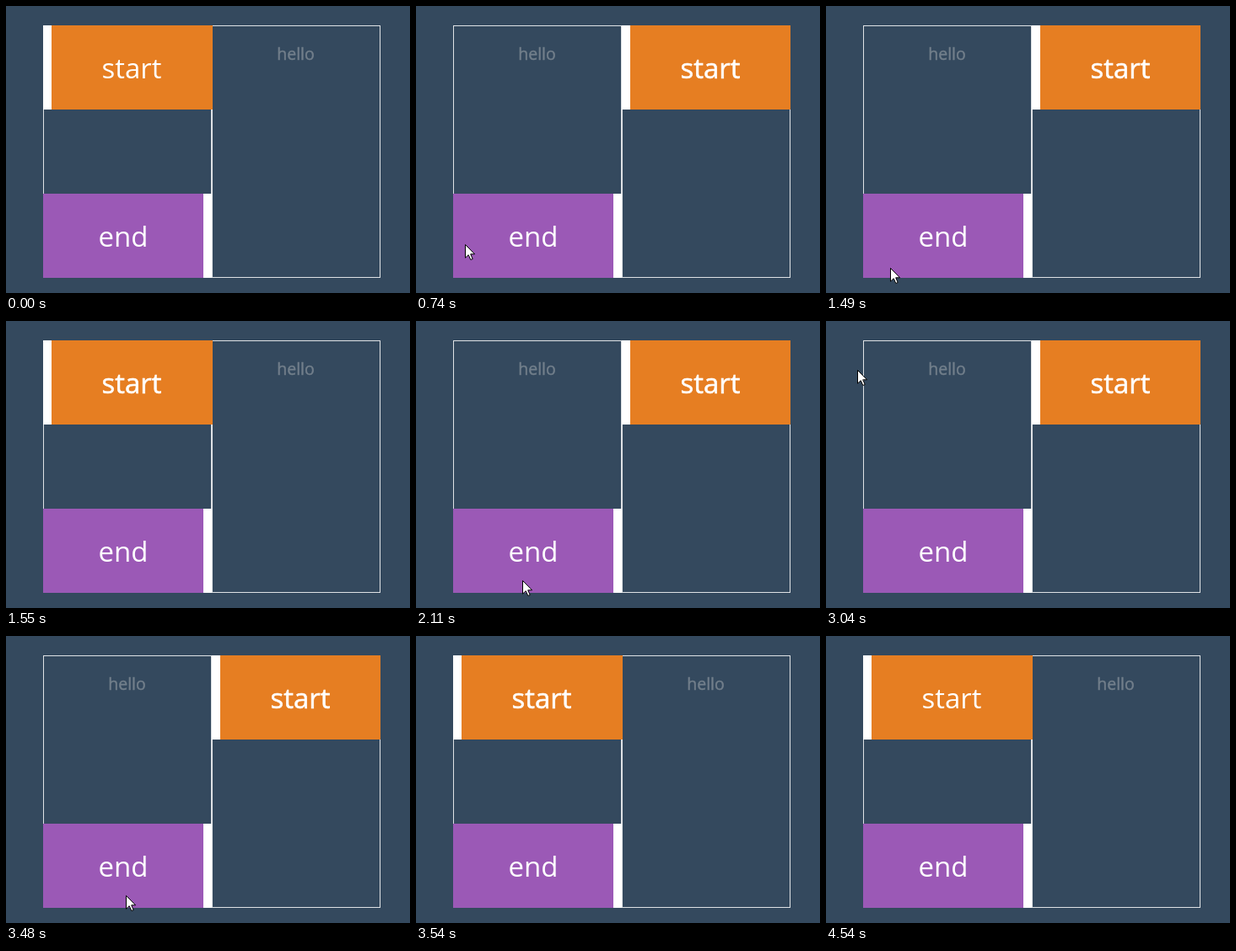
Animation, 479 px wide and 341 px high, one loop 4760 ms. Source, as an HTML page:

```html
<!DOCTYPE html>
<html lang="en">
<head>
<meta charset="utf-8">
<title>Start and end boxes swapping on hover</title>
<style>
  html, body { margin: 0; width: 100%; height: 100%; overflow: hidden; background: #34495e; }
  svg { display: block; }
  text { font: 33px "Open Sans", "Noto Sans", sans-serif; fill: #fff; text-anchor: middle; }
  #hello { font-size: 19.5px; fill: #727f8b; stroke: #727f8b; stroke-width: .4; }
  #label { stroke: #fff; }
</style>
</head>
<body>
<svg width="479" height="341" viewBox="0 0 479 341">
  <g fill="none" stroke="#dfe2e5">
    <rect x="44.5" y="23.5" width="199" height="299"/>
    <rect x="244.5" y="23.5" width="199" height="299"/>
  </g>
  <text id="hello" y="64">hello</text>
  <g id="start">
    <rect x="44" y="23" width="10" height="100" fill="#fff"/>
    <rect id="orange" x="54" y="23" height="100" fill="#e67e22"/>
    <text id="label" x="149" y="86">start</text>
  </g>
  <rect x="44" y="223" width="190" height="100" fill="#9b59b6"/>
  <rect x="234" y="223" width="10" height="100" fill="#fff"/>
  <text x="139" y="286">end</text>
  <path id="cursor" d="M.5 .5V16.2L4.2 12.7 6.8 18.5 9.2 17.5 6.7 11.8H11.6Z" fill="#fff" stroke="#000"/>
</svg>
<script>
const LOOP = 4760;
const $ = id => document.getElementById(id);
const within = (t, from, to) => t >= from && t < to;

// Pointer stops: [from, to, x, y]
const stops = [
  [680, 740, 6, 290],
  [740, 1490, 58, 283],
  [1490, 1550, 76, 311],
  [2110, 2170, 126, 308],
  [2170, 2480, 132, 280],
  [2480, 2540, 138, 316]
];

function pointer(t) {
  // The last visit sweeps from the top left corner to the bottom edge
  if (within(t, 3040, 3540)) {
    const u = Math.min(7, Math.floor((t - 3040) / 60)) / 7;
    return [Math.round(37 + 105 * u * (2 - u)), Math.round(58 + 250 * u)];
  }
  const stop = stops.find(([from, to]) => within(t, from, to));
  return stop && stop.slice(2);
}

function draw(now) {
  const t = now % LOOP;
  const swapped = within(t, 740, 1550) || within(t, 2110, 2540) || within(t, 3040, 3540);
  $("start").setAttribute("transform", `translate(${swapped ? 200 : 0})`);
  $("orange").setAttribute("width", swapped ? 190 : 191);
  $("hello").setAttribute("x", swapped ? 143.5 : 343.5);
  $("label").setAttribute("stroke-width", within(t, 740, 4540) ? .6 : 0);

  const tip = pointer(t);
  $("cursor").setAttribute("visibility", tip ? "visible" : "hidden");
  if (tip) $("cursor").setAttribute("transform", `translate(${tip})`);
}

const began = performance.now();
function tick() {
  draw(performance.now() - began);
  requestAnimationFrame(tick);
}
tick();
</script>
</body>
</html>
```
